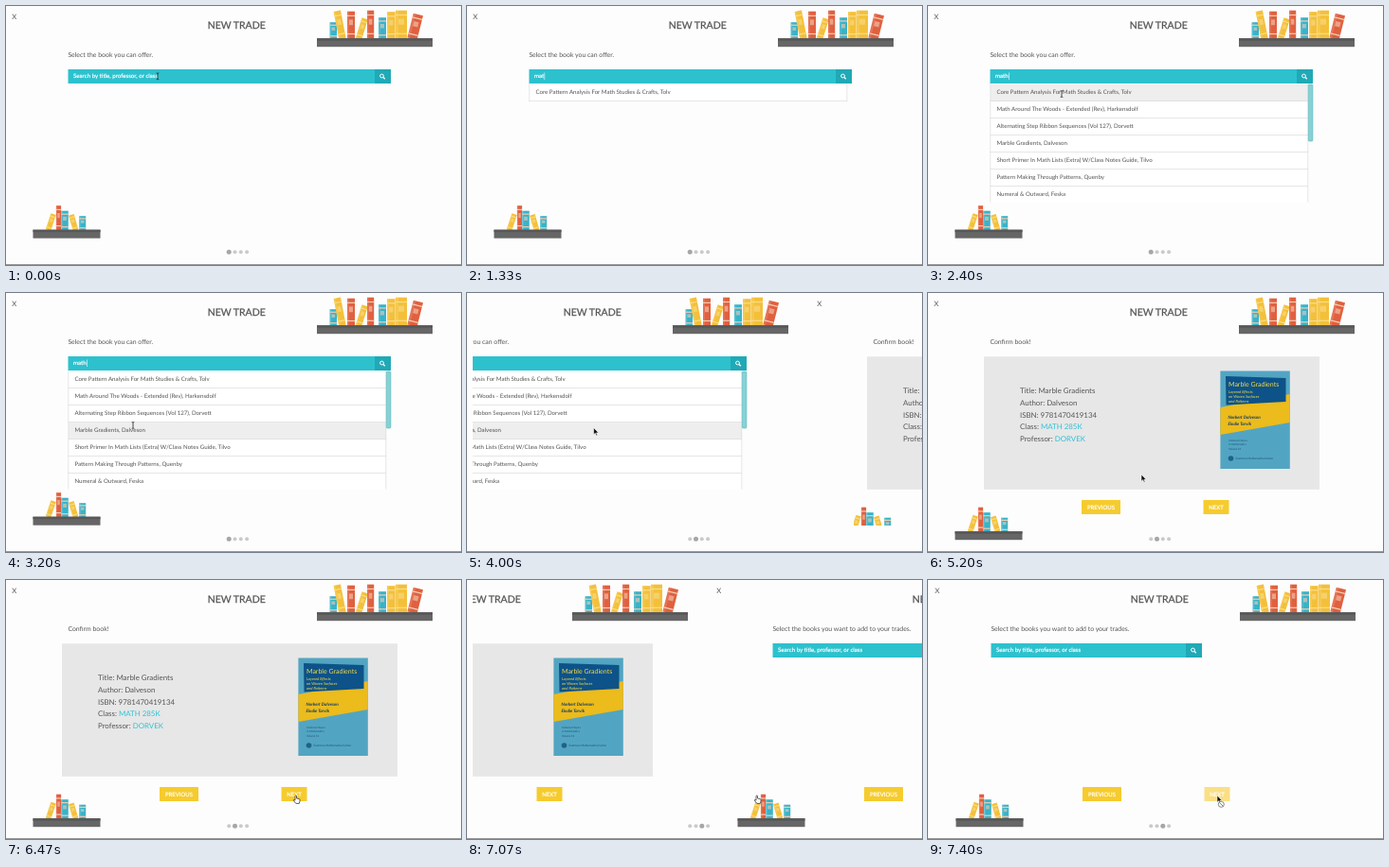
Recreate the animation shown at these times as an HTML page. Size 480 by 274 pixels, loop 7.54 s.

```html
<!DOCTYPE html>
<html lang="en">
<head>
<meta charset="utf-8">
<title>New trade</title>
<style>
html, body { margin: 0; width: 100%; height: 100%; overflow: hidden; background: #fdfdfd; }
svg { display: block; width: 480px; height: 274px; }
text { font-family: Lato, sans-serif; fill: #555; text-rendering: geometricPrecision; }
</style>
</head>
<body>
<svg id="stage" viewBox="0 0 480 274" xmlns="http://www.w3.org/2000/svg"></svg>
<script>
const LOOP = 7540, FRAME = 1000 / 15, PAGE_W = 474, SLIDE = 767;
const TEAL = '#2dc1ce', DARK_TEAL = '#20a9b6', YELLOW = '#f6cb2e';
const BOOK = { r: '#e0603f', y: '#f4c03a', b: '#38b3c8' };
const stage = document.getElementById('stage');

// Markup helpers
const rect = (x, y, w, h, fill, extra = '') =>
  `<rect x="${x}" y="${y}" width="${w}" height="${h}" fill="${fill}" ${extra}/>`;
const text = (x, y, size, str, extra = '') =>
  `<text x="${x}" y="${y}" font-size="${size}" ${extra}>${str.replace(/&/g, '&amp;')}</text>`;
const path = (d, fill, extra = '') => `<path d="${d}" fill="${fill}" ${extra}/>`;
const white = 'style="fill:#fff;stroke:#fff;stroke-width:.2"';

// A book stands on (x, y), x being the middle of its foot
function book([x, w, h, key, tilt], y) {
  const band = key === 'y' ? '#f9dd8a' : '#f3cdb4';
  const l = -w / 2;
  return `<g transform="translate(${x} ${y}) rotate(${tilt || 0})">` +
    rect(l, -h, w, h, BOOK[key]) +
    rect(l, -h, w * .25, h, '#fff', 'opacity=".12"') +
    rect(l, -h * .86, w, 1.2, band) +
    rect(l + w * .25, -h * .7, w * .5, h * .2, band, 'opacity=".6"') +
    rect(l, -h * .2, w, 1.2, band) + '</g>';
}

function shelf(x, y, w, books) {
  return books.map(b => book(b, y)).join('') +
    rect(x, y - .5, w, 9, '#666') + rect(x, y - .5, w, 2.5, '#585858');
}

const bigShelf = shelf(328, 34.7, 122, [
  [345.3, 7.5, 17.5, 'b'], [355, 7.5, 30, 'y', -11], [364, 8, 29, 'r'],
  [372, 6.5, 22.5, 'y', 17], [384.6, 7.2, 30, 'r'], [397, 8, 22.5, 'b'],
  [406.3, 8.6, 28.5, 'y'], [417, 12, 30, 'y'], [428.5, 10.5, 26.5, 'r', 14]
]);
const smallShelf = shelf(28.5, 237.2, 71, [
  [44.5, 5.6, 18, 'y', 18], [55.5, 5.2, 26, 'r'], [62, 7.5, 20.5, 'b'],
  [73.5, 5.8, 17, 'y', -16], [80.7, 7, 15, 'b']
]);

const header = label =>
  text(6.3, 14, 7.6, 'X') +
  text(243.2, 23.7, 10.5, 'NEW TRADE', 'text-anchor="middle" style="stroke:#555;stroke-width:.25"') +
  bigShelf + text(65.4, 54.2, 6.9, label);

const bar = right =>
  rect(65.5, 67, right - 65.5, 15, TEAL) + rect(right - 17, 67, 17, 15, DARK_TEAL) +
  `<g transform="translate(${right - 9.5} 74)" fill="none" stroke="#fff"><circle r="1.9" stroke-width="1"/>` +
  '<path d="M1.5 1.5L3.3 3.3" stroke-width="1.3"/></g>';

const button = (x, w, label, fill = YELLOW) =>
  rect(x, 219, w, 15, fill, 'rx=".6"') +
  text(x + w / 2, 228.7, 6, label, `text-anchor="middle" ${white}`);

const HINT = 'Search by title, professor, or class';
const ROWS = [
  'Core Pattern Analysis For Math Studies & Crafts, Tolv',
  'Math Around The Woods - Extended (Rev), Harkensdolf',
  'Alternating Step Ribbon Sequences (Vol 127), Dorvett',
  'Marble Gradients, Dalveson',
  'Short Primer In Math Lists (Extra) W/Class Notes Guide, Tilvo',
  'Pattern Making Through Patterns, Quenby',
  'Numeral & Outward, Feska'
];

const list = rect(65.5, 82, 335.5, 126, '#fff') +
  rect(66, 83, 335, 17.5, '#eee', 'id="hover"') +
  ROWS.map((row, i) => text(72.4, 93.2 + 18 * i, 6.15, row) +
    rect(65.5, 100.3 + 18 * i, 335.5, .6, '#d5d5d5')).join('') +
  path('M65.8 82V208M400.8 82V208', 'none', 'stroke="#d5d5d5" stroke-width=".6"');

const pageOne = header('Select the book you can offer.') + bar(406) +
  text(71, 76.3, 6.15, HINT, `id="typed" ${white}`) +
  rect(71, 70.5, .6, 7.5, '#fff', 'id="caret"') +
  `<g id="list" clip-path="url(#listClip)">${list}</g>` +
  rect(401.3, 83, 4.6, 60, '#86d2d5', 'id="scroll" rx="1" stroke="#55b5bb" stroke-width=".6"') +
  smallShelf;

const inkTeal = 'style="fill:#2dc1d5"';
const gold = 'style="fill:#f5dc4a"', navy = 'font-weight="700" font-style="italic" style="fill:#123c63"';
const cover = rect(308.4, 82.5, 73.4, 103.5, '#52a5c2') +
  path('M308.4 121L381.8 107V137L308.4 150Z', '#ecbb1c') +
  path('M314 88L377.5 90V115L314.5 118.5Z', '#0d5288') +
  text(317, 99, 7, 'Marble Gradients', gold) +
  ['Layered Effects', 'on Woven Surfaces', 'and Patterns'].map((s, i) =>
    text(317, 106.3 + 4.9 * i, 4.1, s, `font-style="italic" ${gold}`)).join('') +
  text(316.5, 132.8, 4.6, 'Norbert Dalveson', navy) + text(316.5, 140, 4.6, 'Elodie Tarvik', navy) +
  ['Collected Topics', 'in Mathematics', 'Volume 12'].map((s, i) =>
    text(317, 157 + 4.3 * i, 2.8, s, 'style="fill:#1d4d70"')).join('') +
  '<circle cx="319.5" cy="175" r="2.8" fill="#1f6288"/>' +
  text(324.5, 176.2, 3, 'Eastmere Mathematical Union', 'style="fill:#1d4d70"');

const fact = (i, label, value) =>
  text(97, 106.2 + 12.65 * i, 7.9, `${label}: ${value}`);
const link = s => `<tspan ${inkTeal}>${s}</tspan>`;

const pageTwo = header('Confirm book!') + rect(59, 67.3, 354, 140.5, '#e7e7e7') +
  fact(0, 'Title', 'Marble Gradients') + fact(1, 'Author', 'Dalveson') +
  fact(2, 'ISBN', '9781470419134') + fact(3, 'Class', link('MATH 285K')) +
  fact(4, 'Professor', link('DORVEK')) + cover +
  button(162, 41, 'PREVIOUS') + button(290.5, 27, 'NEXT') +
  `<g id="nook"><g transform="translate(0 15.5)">${smallShelf}</g></g>`;

const pageThree = header('Select the books you want to add to your trades.') + bar(288) +
  text(71, 76.3, 6.15, HINT, white) +
  button(162, 41, 'PREVIOUS') + button(290.5, 27, 'NEXT', '#fadf86') +
  `<g transform="translate(0 15.5)">${smallShelf}</g>`;

const outline = 'stroke="#fff" stroke-width=".6" stroke-linejoin="round"';
const arrow = path('M0 0V7.2L1.7 5.7 2.9 8.3 4 7.8 2.9 5.3H5.2Z', '#111', outline);
const cursors = {
  beam: path('M-1.3 -3.5Q0 -3.5 0 -2.6V2.6Q0 3.5 -1.3 3.5M1.3 -3.5Q0 -3.5 0 -2.6M0 2.6Q0 3.5 1.3 3.5',
    'none', 'stroke="#222" stroke-width=".8"'),
  arrow,
  hand: path('M0 .4Q.8 -.4 1.5 .4V3L4.7 3.8Q5.3 4.2 5 6L4.3 8.4H.8L-1.7 5.2Q-1.6 4.1 -.8 4.6L0 5.2Z',
    '#fff', 'stroke="#222" stroke-width=".7"'),
  stop: arrow + '<g transform="translate(4.3 9.3)" stroke="#777" stroke-width=".9">' +
    '<circle r="3" fill="#fff"/><path d="M-2 -2L2 2"/></g>'
};

stage.innerHTML = '<defs><clipPath id="view"><rect x="6" y="0" width="474" height="274"/></clipPath>' +
  '<clipPath id="listClip"><rect id="listBox" x="65" y="82" width="337" height="0"/></clipPath>' +
  '<clipPath id="nookClip"><rect x="45" y="200" width="60" height="46"/></clipPath></defs>' +
  rect(0, 0, 480, 274, '#fdfdfd') + '<g clip-path="url(#view)">' +
  [pageOne, pageTwo, pageThree].map((p, i) => `<g id="page${i}">${p}</g>`).join('') + '</g>' +
  [0, 1, 2, 3].map(i => `<circle id="dot${i}" cx="${235.2 + 6.3 * i}" cy="260.2"/>`).join('') +
  rect(0, 273, 480, 1, '#999') +
  Object.keys(cursors).map(k => `<g id="${k}">${cursors[k]}</g>`).join('');

const el = id => document.getElementById(id);
const show = (id, on) => el(id).setAttribute('display', on ? 'inline' : 'none');
const clamp = v => Math.min(1, Math.max(0, v));
const easeCubic = p => p < .5 ? 4 * p ** 3 : 1 - 4 * (1 - p) ** 3;
const easeSine = p => (1 - Math.cos(Math.PI * p)) / 2;

// Mouse stops: time, x, y
const stops = [
  [0, 160, 74.3], [2000, 160, 74.3], [2400, 141, 93], [2800, 136.5, 124],
  [3330, 133.6, 142.6], [4800, 133.6, 142.6], [5200, 225, 192],
  [5740, 225, 192], [6460, 305, 228], [LOOP, 305, 228]
];
function mouseAt(t) {
  const i = stops.findIndex(s => s[0] > t);
  const [t0, x0, y0] = stops[i - 1], [t1, x1, y1] = stops[i];
  const p = easeSine((t - t0) / (t1 - t0));
  return [x0 + (x1 - x0) * p, y0 + (y1 - y0) * p];
}

function typedAt(t) {
  if (t < 860) return HINT;
  return 'math'.slice(0, t < 990 ? 1 : t < 1120 ? 2 : t < 1860 ? 3 : 4);
}

const slideFrom = (t, begin) => easeCubic(clamp((t - begin) / SLIDE));

function draw(time) {
  const t = Math.floor((time + 4) / FRAME) * FRAME;

  // Pages slide sideways twice
  const slide = slideFrom(t, 3702) + slideFrom(t, 6694);
  for (let i = 0; i < 3; i++)
    el('page' + i).setAttribute('transform', `translate(${Math.round((i - slide) * PAGE_W)} 0)`);

  const active = t < 3660 ? 0 : t < 6660 ? 1 : 2;
  for (let i = 0; i < 4; i++) {
    el('dot' + i).setAttribute('r', i === active ? 2.5 : 2);
    el('dot' + i).setAttribute('fill', i === active ? '#a6a6a6' : '#cacaca');
  }

  // Search field and results
  const word = typedAt(t);
  el('typed').textContent = word;
  const end = word === HINT ? 71 : 71.3 + el('typed').getComputedTextLength();
  el('caret').setAttribute('x', end);
  show('caret', word !== HINT || (t > 60 && t < 525));
  el('listBox').setAttribute('height', t < 1325 ? 0 : t < 1460 ? 19 : t < 1660 ? 70 : 125.5);
  show('scroll', t > 1660);

  const [x, y] = mouseAt(t);
  const row = Math.floor((y - 82.5) / 18);
  const over = row >= 0 && t > 2000;
  show('hover', over);
  if (over) el('hover').setAttribute('y', 83 + 18 * Math.min(row, 3));

  if (t < 4460) el('nook').setAttribute('clip-path', 'url(#nookClip)');
  else el('nook').removeAttribute('clip-path');

  // Mouse pointer
  const kind = t < 3660 ? (t > 860 && t < 2060 ? '' : 'beam')
    : t > 7390 ? 'stop' : x > 290 && y > 219 ? 'hand' : 'arrow';
  for (const k in cursors) show(k, k === kind);
  if (kind) el(kind).setAttribute('transform', `translate(${x.toFixed(2)} ${y.toFixed(2)})`);
}

const start = performance.now();
function tick() {
  draw((performance.now() - start) % LOOP);
  requestAnimationFrame(tick);
}
tick();
</script>
</body>
</html>
```
